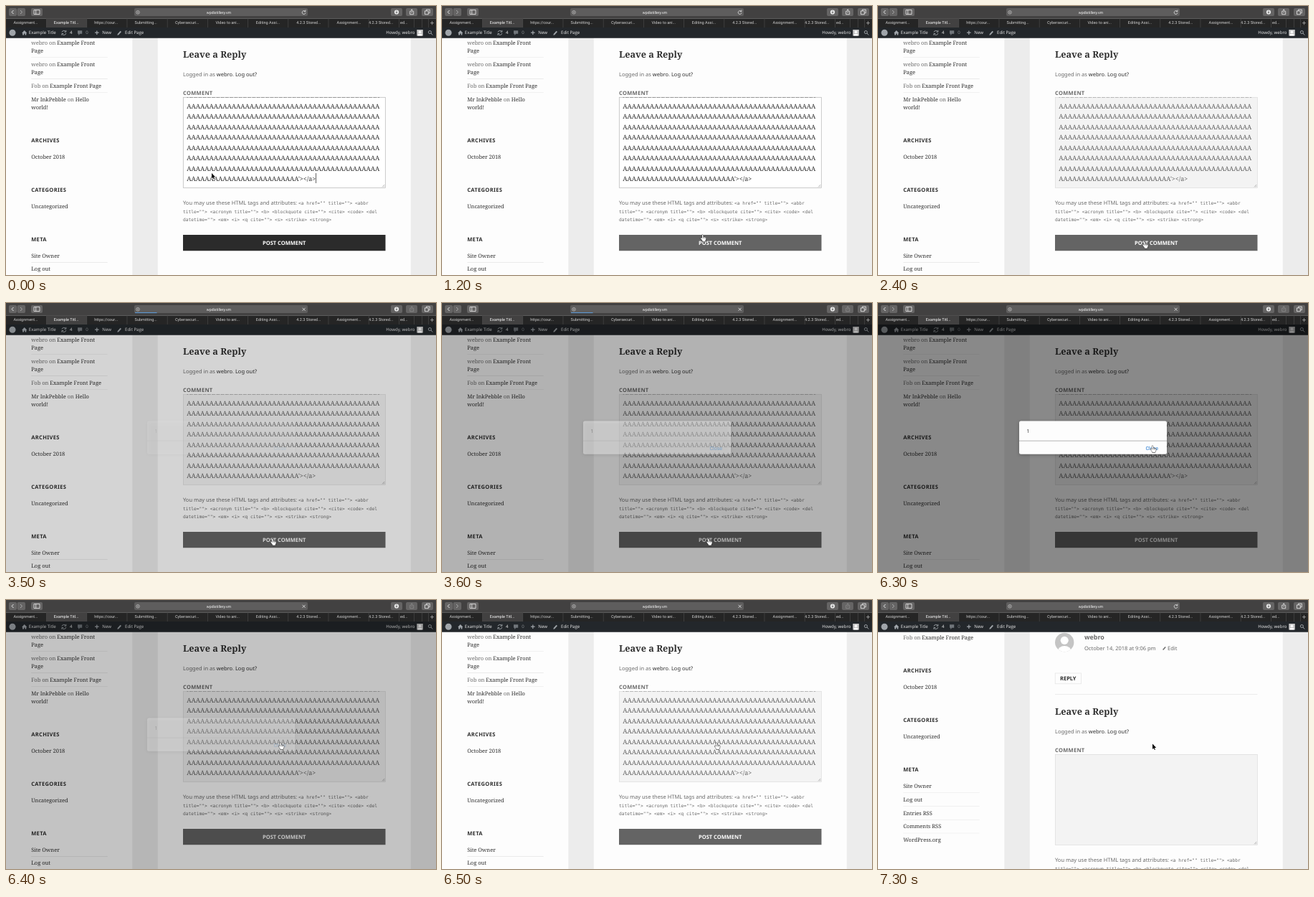
Recreate the animation shown at these times as an HTML page with a canvas. Size 600x375 px, loop 7.7 s.

```html
<!DOCTYPE html>
<html lang="en">
<head>
<meta charset="utf-8">
<title>Comment form</title>
<style>
html, body { margin: 0; width: 100%; height: 100%; overflow: hidden; background: #fff; }
canvas { display: block; }
</style>
</head>
<body>
<canvas id="stage" width="600" height="375"></canvas>
<script>
const ctx = document.getElementById('stage').getContext('2d');
const LOOP = 7700, STEP = 100, DIM = .46;
const SERIF = '"Noto Serif", serif', SANS = '"Noto Sans", sans-serif';
const MONO = '"DejaVu Sans Mono", monospace', UI = 'Roboto, sans-serif', BAR = '"Open Sans", sans-serif';
const DARK = '#2e2e2e', GREY = '#6a6a6a', RULE = '#e6e6e6';
const USER = 'webro';

const ARROW = new Path2D('M0 0V7.5L1.7 5.9 2.8 8.4 3.9 7.9 2.8 5.5H5.2Z');
const HAND = new Path2D('M-1.7-4.3q.9-.7 1.5.3v3q.2-.8 1.4-.1 1-.5 1.4.3 1.2-.2 1.2 1v1.6l-1 2v1h-4v-1l-2.2-2.7q-.7-1.3.4-1.4l1.3 1z');

// time, x, y of the pointer tip
const TRACK = [
  [400, 287, 233], [700, 330, 281], [800, 330, 281], [1300, 372, 330],
  [4800, 372, 330], [4900, 374, 315.5], [5000, 385, 240], [5100, 391, 209],
  [5300, 391, 209], [5600, 378, 208], [5700, 378, 208], [5900, 383, 200.5]
];

const clamp = v => Math.max(0, Math.min(1, v));
const smooth = v => (v = clamp(v)) * v * (3 - 2 * v);

function rect(x, y, w, h, color, r = 0) {
  ctx.fillStyle = color;
  ctx.beginPath();
  ctx.roundRect(x, y, w, h, r);
  ctx.fill();
}

function disc(x, y, r, color) {
  ctx.fillStyle = color;
  ctx.beginPath();
  ctx.arc(x, y, r, 0, 7);
  ctx.fill();
}

function stroke(d, color, width = .8) {
  ctx.strokeStyle = color;
  ctx.lineWidth = width;
  ctx.stroke(new Path2D(d));
}

// y is the middle of the capitals; returns the right end
function text(s, x, y, size, family, color, { bold = false, align = 'left', gap = 0 } = {}) {
  ctx.font = `${bold ? 'bold ' : ''}${size}px ${family}`;
  ctx.textRendering = 'geometricPrecision';
  ctx.letterSpacing = gap + 'px';
  ctx.textAlign = align;
  ctx.fillStyle = color;
  ctx.fillText(s, x, y + size * .36);
  return x + ctx.measureText(s).width;
}

function shifted(dy, draw) {
  ctx.save();
  ctx.translate(0, dy);
  draw();
  ctx.restore();
}

function toolbar(t) {
  const loading = t >= 2500 && t < 6600;
  rect(0, 0, 600, 17.5, '#424141');
  rect(0, 17.5, 600, 12.5, '#252525');
  rect(56, 17.5, 57, 12.5, '#424141');
  for (const [x, w] of [[4, 11], [15.6, 11.4], [35, 16], [537, 16], [558, 16], [580, 16]])
    rect(x, 3, w, 11, '#656464', 2);
  stroke('M10.5 6 8 8.5 10.5 11', '#eee', 1);
  stroke('M20 6 22.5 8.5 20 11', '#aaa', 1);
  stroke('M39 5.5h8v6h-8zM41.7 5.5v6', '#eee');
  rect(179, 3, 242, 11, '#5e5d5d', 2);
  stroke('M186.3 8.8a2.3 2.3 0 1 1-4.6 0a2.3 2.3 0 1 1 4.6 0', '#ccc', .7);
  disc(184, 8.8, .8, '#ccc');
  text('wpdistillery.vm', 297, 8.8, 5.2, UI, '#fff', { align: 'center' });
  if (loading) {
    stroke('M413.6 6.8l4 4m0-4l-4 4', '#eee');
    if (t < 3800) rect(180, 13.1, 30.5 * clamp((t - 2400) / 800), 1, '#5d9fe0');
  } else {
    stroke('M417.4 7.4A2.4 2.4 0 1 0 418 9.5M417.9 5.6v2.1h-2.1', '#eee');
  }
  disc(545, 8.5, 3.1, '#eee');
  stroke('M545 6.6v3.4m-1.4-1.4 1.4 1.4 1.4-1.4', '#555');
  stroke('M565 7.3h-1.3v4.4h5V7.3h-1.3M566.2 9.6V4.8m-1.4 1.4 1.4-1.4 1.4 1.4', loading ? '#8c8c8c' : '#eee');
  stroke('M584.5 6.9h4.8v4.8h-4.8zM586.5 6.9V5h4.8v4.8h-2', '#eee');

  const tabs = ['Assignment...', 'Example Titl...', 'https://cour...', 'Submitting...', 'Cybersecuri...',
    'Video to ani...', 'Editing Assi...', '4.2.3 Stored...', 'Assignment...'];
  const label = (s, x, color = '#d0d0d0') => text(s, x, 23.5, 5.55, UI, color);
  tabs.forEach((s, i) => label(s, 10.4 + i * 56.4, i == 1 ? '#fff' : undefined));
  label('4.2.3 Stored...', 506);
  label('ed...', 550);
  for (let i = 1; i < 10; i++) rect(i * 56.2, 17.5, .7, 12.5, '#484848');
  for (const x of [548, 569, 580, 589]) rect(x, 17.5, .7, 12.5, '#484848');
  stroke('M592 23.7h5M594.5 21.2v5', '#bbb', .7);
}

function adminBar() {
  const item = (s, x) => text(s, x, 37.2, 6.1, BAR, '#eee');
  const icon = '#a0a5aa';
  rect(0, 30, 600, 14.8, '#23272b');
  disc(9, 37.2, 4.5, icon);
  ctx.fillStyle = icon;
  ctx.fill(new Path2D('M22 37.8 25.7 34 29.4 37.8H28.3V40.6H26.5V38.4H25V40.6H23.1V37.8Z'));
  item('Example Title', 31.8);
  stroke('M78 36.5A3 3 0 0 1 83.4 35.7M83.8 38A3 3 0 0 1 78.3 39M83.8 33.8V36.2H81.4M77.9 40.8V38.5H80.2', icon, .9);
  item('4', 89);
  ctx.fillStyle = '#70757a';
  ctx.fill(new Path2D('M100 34.2h6.2v4.6h-3l-2 2.2v-2.2H100z'));
  text('0', 111.2, 37.2, 6.1, BAR, '#8b9094');
  stroke('M124 37.2h5.6M126.8 34.4v5.6', icon, 1.2);
  item('New', 134.3);
  stroke('M156.2 39.8 160.3 35.3', icon, 1.9);
  disc(156, 40.1, .7, icon);
  item('Edit Page', 166);
  text('Howdy, ' + USER, 570.5, 37.2, 6.1, BAR, '#eee', { align: 'right' });
  rect(573.3, 33, 8.5, 8.5, '#c8c8c8');
  person(577.5, 37.2, 4.2);
  stroke('M593.4 36.5a2 2 0 1 1-4 0a2 2 0 1 1 4 0M593 38l2.3 2.5', icon, 1);
}

function person(x, y, r) {
  ctx.save();
  ctx.beginPath();
  ctx.rect(x - r, y - r, 2 * r, 2 * r);
  ctx.clip();
  disc(x, y - r * .2, r * .42, '#fff');
  ctx.beginPath();
  ctx.ellipse(x, y + r * .95, r * .72, r * .58, 0, 0, 7);
  ctx.fill();
  ctx.restore();
}

const side = (s, y, color = DARK) => text(s, 35.2, y, 7.5, SERIF, color);
const heading = (s, y) => text(s, 35.2, y, 7.5, SANS, DARK, { bold: true, gap: .35 });
const sideRule = y => rect(35.2, y, 106.5, .6, RULE);

function sideComment(name, post, y, color = GREY) {
  let x = side(name, y, color);
  x = text(' on ', x, y, 7.5, SERIF, GREY);
  text(post, x, y, 7.5, SERIF, DARK);
}

function sidebar(posted) {
  if (posted) {
    sideComment('Fob', 'Example Front Page', 52.3);
  } else {
    sideComment(USER, 'Example Front', 51);
    side('Page', 62.3);
    sideRule(71.2);
    sideComment(USER, 'Example Front', 81);
    side('Page', 92.3);
    sideRule(101.3);
    sideComment('Fob', 'Example Front Page', 111);
    sideRule(120.2);
    sideComment('Mr InkPebble', 'Hello', 130, DARK);
    side('world!', 141);
  }
  shifted(posted ? -88.6 : 0, () => {
    heading('ARCHIVES', 187);
    side('October 2018', 210);
    heading('CATEGORIES', 256);
    side('Uncategorized', 279);
    heading('META', 325.3);
    ['Site Owner', 'Log out', 'Entries RSS', 'Comments RSS', 'WordPress.org'].forEach((s, i) => {
      side(s, 348 + i * 18.75);
      if (i) sideRule(338.3 + i * 18.75);
    });
  });
}

function postedComment() {
  disc(260.2, 59, 13.2, '#c4c4c4');
  ctx.save();
  ctx.beginPath();
  ctx.arc(260.2, 59, 13.2, 0, 7);
  ctx.clip();
  person(260.2, 59, 13.2);
  ctx.restore();
  text(USER, 288, 52, 8.9, SANS, GREY, { bold: true });
  text('October 14, 2018 at 9:06 pm', 288, 67.3, 7.5, SANS, GREY);
  stroke('M397.6 69.4 401.2 65.6', GREY, 1.5);
  text('Edit', 404, 67.3, 7.5, SANS, GREY);
  ctx.strokeStyle = '#e2e2e2';
  ctx.lineWidth = .7;
  ctx.strokeRect(247.2, 102, 36.3, 14.8);
  text('REPLY', 254, 109.4, 7.5, SANS, DARK, { bold: true });
  rect(247, 131.3, 282.5, .6, RULE);
}

function textarea(t, posted) {
  const focus = t < 2400;
  rect(247, 127, 282.5, 126.5, focus ? '#fff' : '#f3f3f3');
  ctx.strokeStyle = focus ? '#b4b4b4' : '#dcdcdc';
  ctx.lineWidth = .7;
  ctx.strokeRect(247.3, 127.3, 282, 126);
  stroke('M525 252.3l3.3-3.3M527 252.3l1.3-1.3', '#888', .6);
  if (posted) return;
  const color = focus ? DARK : '#606060';
  ctx.save();
  ctx.beginPath();
  ctx.rect(247, 127.5, 282, 125.5);
  ctx.clip();
  let end;
  for (let i = -1; i < 8; i++)
    end = text(i < 7 ? 'A'.repeat(43) : 'A'.repeat(25) + "'></a>", 252.2, 139.5 + i * 14.5, 8.9, SERIF, color);
  ctx.restore();
  const caret = t < 200 || t >= 600 && t < 1100 || t >= 1600 && t < 2100;
  if (focus && caret) rect(end, 233, .7, 14, '#222');
}

function form(t, posted) {
  text('Leave a Reply', 247, 67, 12.66, SERIF, DARK, { bold: true });
  let x = text('Logged in as ', 247, 95.3, 7.5, SANS, GREY);
  x = text(USER, x, 95.3, 7.5, SANS, DARK);
  x = text('. ', x, 95.3, 7.5, SANS, GREY);
  text('Log out?', x, 95.3, 7.5, SANS, DARK);
  text('COMMENT', 247, 121.5, 7.5, SANS, GREY, { bold: true, gap: .3 });
  textarea(t, posted);
  const code = (s, x, y) => text(s, x, y, 6.25, MONO, GREY);
  x = text('You may use these HTML tags and attributes: ', 247, 274.3, 7.5, SANS, GREY);
  code('<a href="" title=""> <abbr', x, 274.8);
  code('title=""> <acronym title=""> <b> <blockquote cite=""> <cite> <code> <del', 247, 286.5);
  code('datetime=""> <em> <i> <q cite=""> <s> <strike> <strong>', 247, 298.2);
  rect(247, 319, 282.5, 22.3, t >= 1200 && !posted ? '#646464' : '#2b2b2b');
  text('POST COMMENT', 388.2, 330, 7.5, SANS, '#fff', { bold: true, align: 'center' });
}

function dialog(alpha) {
  ctx.save();
  ctx.globalAlpha = alpha;
  ctx.shadowColor = 'rgba(0,0,0,.25)';
  ctx.shadowBlur = 5;
  ctx.shadowOffsetY = 1;
  rect(197, 164.5, 206, 46.2, '#fdfdfd', 2.5);
  ctx.shadowColor = 'transparent';
  rect(197, 191.7, 206, .7, '#9a9a9a');
  text('1', 207.6, 179, 6.8, UI, '#333');
  text('Close', 373.4, 202, 7, UI, '#1b74cf');
  ctx.restore();
}

function tip(t) {
  const i = TRACK.findIndex(k => k[0] > t);
  if (i == 0) return TRACK[0].slice(1);
  if (i < 0) return TRACK.at(-1).slice(1);
  const [t0, x0, y0] = TRACK[i - 1], [t1, x1, y1] = TRACK[i];
  const p = (t - t0) / (t1 - t0);
  return [x0 + (x1 - x0) * p, y0 + (y1 - y0) * p];
}

function pointer(t) {
  const [x, y] = tip(t);
  const hand = t >= 1200 && t <= 4800 || t >= 5900 && t < 7000;
  ctx.save();
  ctx.translate(x + hand, y + hand * 3);
  ctx.lineJoin = 'round';
  ctx.strokeStyle = hand ? '#111' : '#fff';
  ctx.lineWidth = hand ? .9 : 1.1;
  ctx.fillStyle = hand ? '#fff' : '#000';
  const shape = hand ? HAND : ARROW;
  ctx.stroke(shape);
  ctx.fill(shape);
  if (hand) stroke('M-.2-1V.6M1.2-1.1V.7M2.6-.8V.8', '#111', .5);
  ctx.restore();
}

function draw(t) {
  const posted = t >= 6600;
  rect(0, 0, 600, 375, '#ececec');
  rect(0, 44, 176.3, 331, '#fdfdfd');
  rect(211.8, 44, 353, 331, '#fdfdfd');
  sidebar(posted);
  if (posted) postedComment();
  shifted(posted ? 88 : 0, () => form(t, posted));
  adminBar();
  const shown = t < 6300 ? smooth((t - 3300) / 500) : clamp((6500 - t) / 200);
  if (shown) {
    rect(0, 30, 600, 345, `rgba(0,0,0,${DIM * shown})`);
    dialog(shown * shown);
  }
  toolbar(t);
  pointer(t);
}

const start = performance.now();
function tick() {
  const t = (performance.now() - start) % LOOP;
  draw(Math.floor(t / STEP) * STEP);
  requestAnimationFrame(tick);
}
tick();
</script>
</body>
</html>
```
